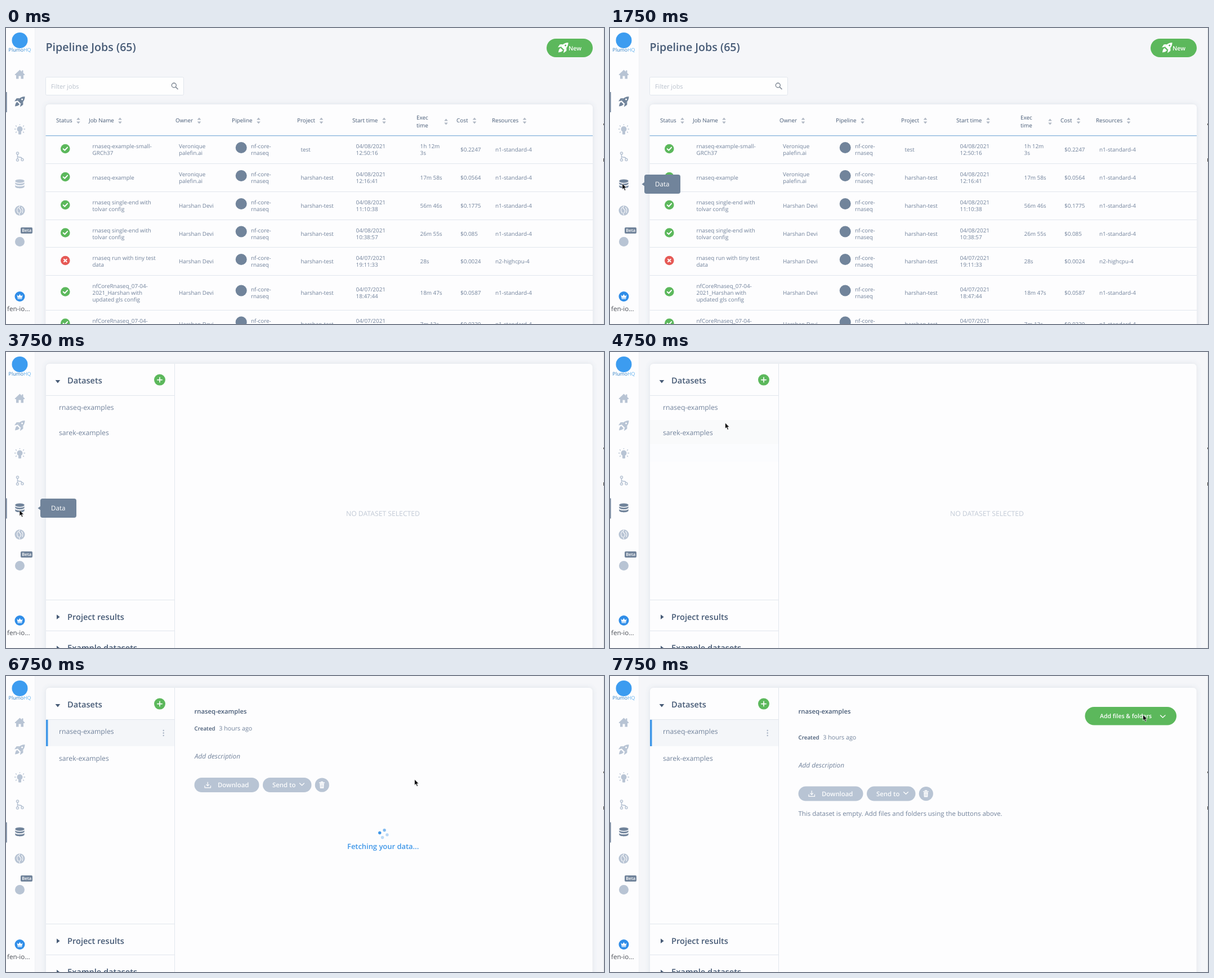
Animation, 1062 px wide and 527 px high, one loop 8 s. Source, as an HTML page:

```html
<!DOCTYPE html>
<html lang="en">
<head>
<meta charset="utf-8">
<title>Pipeline jobs and datasets</title>
<style>
html, body { margin: 0; width: 100%; height: 100%; overflow: hidden; background: #f5f6f9; }
svg { display: block; width: 100vw; height: 100vh; font-family: "Open Sans", sans-serif; text-rendering: geometricPrecision; }
</style>
</head>
<body>
<svg id="stage" viewBox="0 0 1062 527"></svg>
<script>
const LOOP = 8000, TICK = 250;
const INK = '#475b76', BODY = '#71829b', SLATE = '#71849b', PALE = '#b8c4d4',
      GREEN = '#5cb85c', BLUE = '#3f97e8', PANEL = '#fdfdfe', LINE = '#e1e6ed';

// y is the visual middle of the line
const text = (x, y, s, size = 9.9, fill = BODY, extra = '') =>
  `<text x="${x}" y="${y + size * 0.355}" font-size="${size}" fill="${fill}" ${extra}>${s}</text>`;
const bold = (x, y, s, size, fill) => text(x, y, s, size, fill, 'font-weight="600"');
const rect = (x, y, w, h, fill, r = 0, extra = '') =>
  `<rect x="${x}" y="${y}" width="${w}" height="${h}" rx="${r}" fill="${fill}" ${extra}/>`;
const dot = (x, y, r, fill, extra = '') => `<circle cx="${x}" cy="${y}" r="${r}" fill="${fill}" ${extra}/>`;
const path = (d, fill, extra = '') => `<path d="${d}" fill="${fill}" ${extra}/>`;
const stroke = (d, color, w = 1.3) => path(d, 'none', `stroke="${color}" stroke-width="${w}" stroke-linecap="round" stroke-linejoin="round"`);
const rule = (x1, x2, y, color = LINE) => rect(x1, y, x2 - x1, 1, color);
const at = (x, y, s, extra = '') => `<g transform="translate(${x} ${y})" ${extra}>${s}</g>`;
const group = (id, s) => `<g id="${id}">${s}</g>`;
const lines = (x, y, s) => s.split('|').map((l, i, a) => text(x, y + (i - (a.length - 1) / 2) * 12, l)).join('');

const rocket = path('M9-9C3-9-1-6-4-2L2 4C6 1 9-3 9-9ZM5.6-4A1.5 1.5 0 1 1 2.6-4A1.5 1.5 0 1 1 5.6-4Z' +
  'M-4-1.5L-9.5-.5-5.8-5.8-.8-6ZM1.5 4L.5 9.5 5.8 5.8 6 .8ZM-4.8.4L-.4 4.8C-2 7.4-5 8-8.5 8.5-8 5-7.4 2-4.8.4Z', 'currentColor', 'fill-rule="evenodd"');
const home = path('M0-8L3.5-4.7V-7H6V-2.4L9 .4 8 1.4H6.5V8H2V3H-2V8H-6.5V1.4H-8L-9 .4Z', 'currentColor');
const bulb = dot(0, -1, 5, 'currentColor') + rect(-2.5, 3, 5, 5.5, 'currentColor', 1) +
  stroke('M-9-1H-7.5M9-1H7.5M-7-7L-6-6M7-7L6-6M-7 5L-6 4M7 5L6 4M0-9V-8.5', 'currentColor', 1.4);
const branch = stroke('M-4-4V5M-4-1C-4 3 4-1 4 4', 'currentColor', 1.6) +
  [[-4, -6], [-4, 6], [4.5, 5.5]].map(([x, y]) => dot(x, y, 2, PANEL, 'stroke="currentColor" stroke-width="1.5"')).join('');
const band = y => path(`M-8.2 ${y}c1 3.6 15.4 3.6 16.4 0v3.2c-1 3.8-15.4 3.8-16.4 0z`, 'currentColor');
const database = '<ellipse cy="-5.4" rx="8.2" ry="3.2" fill="currentColor"/>' + band(-3.4) + band(1.4) +
  stroke('M-8.2-.2c1 3.8 15.4 3.8 16.4 0', PANEL, .9);
const helix = dot(0, 0, 9, 'currentColor') +
  stroke('M0-8C-5-3 5-2 1.5 2.5S-1 5 0 8M-3-5.5C-6-2-5 2-2.5 4.5M3-5.5C6-3 5.5 1 4.5 4', PANEL, 1.1);
const crown = dot(0, 0, 9, '#2f8de8') + path('M-5-3L-2.5-.5 0-4 2.5-.5 5-3 4 2.5H-4ZM-4 3.3H4V4.6H-4Z', '#fff');
const icon = (y, s, id = '') => at(24.5, y, s, `color="${PALE}" ${id && `id="${id}"`}`);

const sidebar = rect(0, 0, 51, 527, PANEL) + rect(51, 0, 1, 527, '#eff1f5') +
  dot(24.5, 22, 14, '#3c9cf0') +
  `<text x="24.5" y="41.8" font-size="8.8" text-anchor="middle" fill="#2f7fc4">Plumo<tspan fill="#5fb0ee">HQ</tspan></text>` +
  rect(0, 114, 1.6, 36, SLATE, 0, 'id="bar"') +
  icon(82.5, home) + icon(131, rocket, 'navJobs') + icon(181, bulb) + icon(229, branch) +
  icon(278, database, 'navData') + icon(325, helix) + icon(380.5, dot(0, 0, 8.5, 'currentColor')) +
  rect(26, 355, 21, 11, SLATE, 2) + bold(28.3, 360.7, 'Beta', 7.6, '#fff') +
  at(24.5, 478, crown) + text(2, 500, 'fen-io...', 11.6, '#4b4f57');

const sorter = (x, y = 165) => path(`M${x - 3.3} ${y - 1.6}l3.3-3.8 3.3 3.8zM${x - 3.3} ${y + 1.6}l3.3 3.8 3.3-3.8z`, '#b0b8c4');
const heads = [[89, 'Status', 128.5], [147, 'Job Name', 202.5], [301, 'Owner', 343], [401, 'Pipeline', 448.5],
  [517, 'Project', 560], [615, 'Start time', 671.5], [800, 'Cost', 832], [863, 'Resources', 921]];

const ME = 'Harshan Devi', MINE = 'harshan-test', GUEST = 'Veronique|palefin.ai';
const jobs = [
  [216.5, 'rnaseq-example-small-|GRCh37', GUEST, 'test', '04/08/2021|12:50:16', '1h 12m|3s', '$0.2247'],
  [266.5, 'rnaseq-example', GUEST, MINE, '04/08/2021|12:16:41', '17m 58s', '$0.0564'],
  [316.5, 'rnaseq single-end with|tolvar config', ME, MINE, '04/08/2021|11:10:38', '56m 46s', '$0.1775'],
  [366, 'rnaseq single-end with|tolvar config', ME, MINE, '04/08/2021|10:38:57', '26m 55s', '$0.085'],
  [415.5, 'rnaseq run with tiny test|data', ME, MINE, '04/07/2021|19:11:33', '28s', '$0.0024', 'n2-highcpu-4'],
  [471, 'nfCoreRnaseq_07-04-|2021_Harshan with|updated gls config', ME, MINE, '04/07/2021|18:47:44', '18m 47s', '$0.0587'],
  [527, 'nfCoreRnaseq_07-04-|2021_Harshan', ME, MINE, '04/07/2021|18:21:09', '7m 13s', '$0.0330']
];
const status = ok => dot(0, 0, 8.3, ok ? GREEN : '#e65a56') +
  stroke(ok ? 'M-3.6.2L-1 2.8 3.8-2.4' : 'M-2.3-2.3L2.3 2.3M2.3-2.3L-2.3 2.3', '#fff', 2);
const jobRow = ([y, name, owner, project, start, exec, cost, machine = 'n1-standard-4']) =>
  at(105.3, y - 1.5, status(machine[1] === '1')) + dot(417.7, y - 3.5, 10, SLATE) +
  [[153.5, name], [307, owner], [435, 'nf-core-|rnaseq'], [523.5, project], [621.5, start], [735.5, exec], [807, cost], [869, machine]]
    .map(([x, s]) => lines(x, y, s)).join('');

const jobsPage = bold(70.5, 34, 'Pipeline Jobs (65)', 19.6, INK) +
  rect(960, 19, 82, 33, GREEN, 16.5) + at(989.5, 35, rocket, 'color="#fff"') + bold(999, 36, 'New', 10.7, '#fff') +
  rect(70.5, 87.5, 245, 32, '#fefefe', 2, `stroke="${LINE}"`) + text(80, 103.7, 'Filter jobs', 10.9, '#b9c1cc') +
  `<circle cx="298.3" cy="102" r="4" fill="none" stroke="#77818e" stroke-width="1.3"/>` + stroke('M301.3 105L305 108.8', '#77818e', 1.5) +
  rect(70.5, 136, 971.5, 420, PANEL, 6, 'filter="url(#soft)"') +
  heads.map(([x, s, a]) => text(x, 164.5, s, 9.9, INK) + sorter(a)).join('') +
  text(729, 159.5, 'Exec', 9.9, INK) + text(729, 173.5, 'time', 9.9, INK) + sorter(781.5, 167) +
  rect(70.5, 191, 971.5, 1.4, '#8fb9de') +
  [241, 291, 341, 390, 440, 502].map(y => rule(70.5, 1042, y)).join('') +
  jobs.map(jobRow).join('');

const pill = (x, w, s, tx) => rect(x, 181, w, 26, PALE, 13) + bold(tx, 194.2, s, 11.4, '#fbfcfd');
const trash = stroke('M556.5 190H565.5M559.5 190V188.3H562.5V190', '#fff', 1.3) +
  path('M557.3 191.3H564.7L564.2 200H557.8Z', '#fff') + stroke('M559.8 193.2V198M562.2 193.2V198', PALE, .8);

const details = bold(334.5, 63.5, 'rnaseq-examples', 11.25, INK) +
  group('meta',
    bold(334.5, 93.7, 'Created', 9.8, INK) + text(378.3, 93.5, '3 hours ago', 10.7) +
    text(335, 143, 'Add description', 11.8, BODY, 'font-style="italic"') +
    pill(334.5, 115, 'Download', 376) + pill(456, 86.5, 'Send to', 473) + dot(561.3, 194, 12.6, PALE) +
    stroke('M353 195.5V198.8H363.5V195.5M358.2 189V195.5M355.8 193.3L358.2 195.7 360.6 193.3', '#fff', 1.2) +
    stroke('M521.5 191L525.5 194.7 529.5 191', '#fff') + group('trash', trash)) +
  group('fetching', at(670.3, 281, '', 'id="spinner"') + bold(606, 303.3, 'Fetching your data...', 12.95, BLUE)) +
  group('ready',
    rect(843.5, 55, 162.5, 32.5, GREEN, 16.2) + bold(870, 71.3, 'Add files &amp; folders', 10.5, '#fff') +
    stroke('M977.5 70L981.7 74 986 70', '#fff', 1.4) +
    text(334.5, 244.7, 'This dataset is empty. Add files and folders using the buttons above.', 11.45));

const dataPage = rect(71, 21, 970.5, 540, PANEL, 6, 'filter="url(#soft)"') +
  group('rowHover', rect(71, 121, 228, 43, '#f9fafb') + rect(71, 164, 228, 31, '#fbfcfe')) +
  group('rowActive', rect(71, 78, 228, 47, '#f4f6f9') + [97, 101.5, 106].map(y => dot(279.7, y, 1.2, '#a7b3c4')).join('')) +
  rect(71, 78, 3.5, 47, BLUE, 0, 'id="rowBar"') +
  rect(299, 21, 1, 506, LINE) + [77, 441, 496].map(y => rule(71, 299, y)).join('') +
  path('M87.6 50H96.2L91.9 55.6Z', INK) + bold(109, 51.3, 'Datasets', 14.6, INK) +
  dot(273, 49.6, 10, GREEN) + stroke('M268.8 49.6H277.2M273 45.4V53.8', '#fff', 1.6) +
  text(94, 99, 'rnaseq-examples', 12.2) + group('second', text(94, 143.4, 'sarek-examples', 12.2)) +
  [[471.8, 'Project results'], [527.3, 'Example datasets']].map(([y, s]) =>
    path(`M90 ${y - 4.3}V${y + 4.3}L95.6 ${y}Z`, INK) + bold(109, y, s, 14.6, INK)).join('') +
  group('empty', text(604, 287.3, 'NO DATASET SELECTED', 12.2, '#c2cad6')) + group('details', details);

const tip = path('M56.5 278L62 274V282Z', SLATE) + rect(61, 261, 64, 34, SLATE, 4) + text(80, 278.3, 'Data', 11.6, '#fff');
const arrow = path('M0 0V10.4L2.4 8.3 4.2 12.4 6 11.6 4.3 7.7H7.6Z', '#0b0b0d', 'stroke="#fff" stroke-width=".7"');

document.getElementById('stage').innerHTML =
  '<defs><filter id="soft" x="-5%" y="-5%" width="110%" height="110%"><feDropShadow dx="0" dy="0" stdDeviation="4" flood-color="#5a6f8c" flood-opacity=".16"/></filter></defs>' +
  rect(0, 0, 1062, 527, '#f5f6f9') + group('jobs', jobsPage) + group('data', dataPage) + sidebar +
  rect(1061, 0, 1, 527, '#e3e5e9') + rect(1061, 170, 1, 3, '#333') + rect(1061, 232, 1, 6, '#333') +
  group('tip', tip) + group('cursor', arrow);

const $ = id => document.getElementById(id);
const show = (id, on) => { $(id).style.display = on ? '' : 'none'; };
const move = (id, x, y) => $(id).setAttribute('transform', `translate(${x} ${y})`);

// time, x, y of the pointer tip
const trail = [[1250, 21, 276.5], [1500, 21.8, 277], [2000, 21.8, 277], [3250, 24, 281.5], [4000, 24, 281.5],
  [4750, 204.5, 126], [5250, 204.5, 119], [5500, 204.5, 118], [6000, 204.5, 118], [6750, 725.5, 184], [7000, 946.5, 69]];

function pointer(t) {
  const i = trail.findIndex(k => k[0] > t);
  if (i < 0) return trail[trail.length - 1].slice(1);
  const [a, b] = [trail[Math.max(i - 1, 0)], trail[i]];
  const u = Math.max(0, (t - a[0]) / (b[0] - a[0])), e = u * u * (3 - 2 * u);
  return [a[1] + (b[1] - a[1]) * e, a[2] + (b[2] - a[2]) * e];
}

function spinner(t) {
  const head = -20 + (t - 6000) * 215 / 750, glow = Math.min(1, .62 + (t - 6000) / 1500);
  return [1, .65, .36, .34].map((o, i) => {
    const a = (head + i * 90) * Math.PI / 180;
    return dot(6.8 * Math.cos(a), 6.8 * Math.sin(a), 2.7, BLUE, `opacity="${Math.max(.3, o * glow)}"`);
  }).join('');
}

function tipOpacity(t) {
  if (t < 1250 || t >= 4500) return 0;
  return t < 4250 ? Math.min(1, .3 + (t - 1250) / 600) : .4;
}

function draw(t) {
  const onData = t >= 3750, picked = t >= 6000, loaded = t >= 7000, hovered = t >= 5000;
  show('jobs', !onData);
  show('data', onData);
  $('bar').setAttribute('y', onData ? 260.5 : 114);
  $('navJobs').setAttribute('color', onData ? PALE : SLATE);
  $('navData').setAttribute('color', t >= 1250 ? SLATE : PALE);
  $('tip').style.opacity = tipOpacity(t);
  show('rowHover', t >= 4500 && !hovered);
  show('rowActive', hovered);
  show('rowBar', picked);
  move('second', 0, hovered ? 3 : 0);
  show('empty', !picked);
  show('details', picked);
  show('trash', t >= 6250);
  show('fetching', !loaded);
  show('ready', loaded);
  move('meta', 0, loaded ? 15.6 : 0);
  if (picked && !loaded) $('spinner').innerHTML = spinner(t);
  show('cursor', t >= 1250);
  move('cursor', ...pointer(t));
}

// the picture advances four times a second
let begin, last;
function frame(now) {
  begin ??= now;
  const t = Math.floor((now - begin) % LOOP / TICK) * TICK;
  if (t !== last) draw(last = t);
  requestAnimationFrame(frame);
}
draw(0);
requestAnimationFrame(frame);
</script>
</body>
</html>
```
